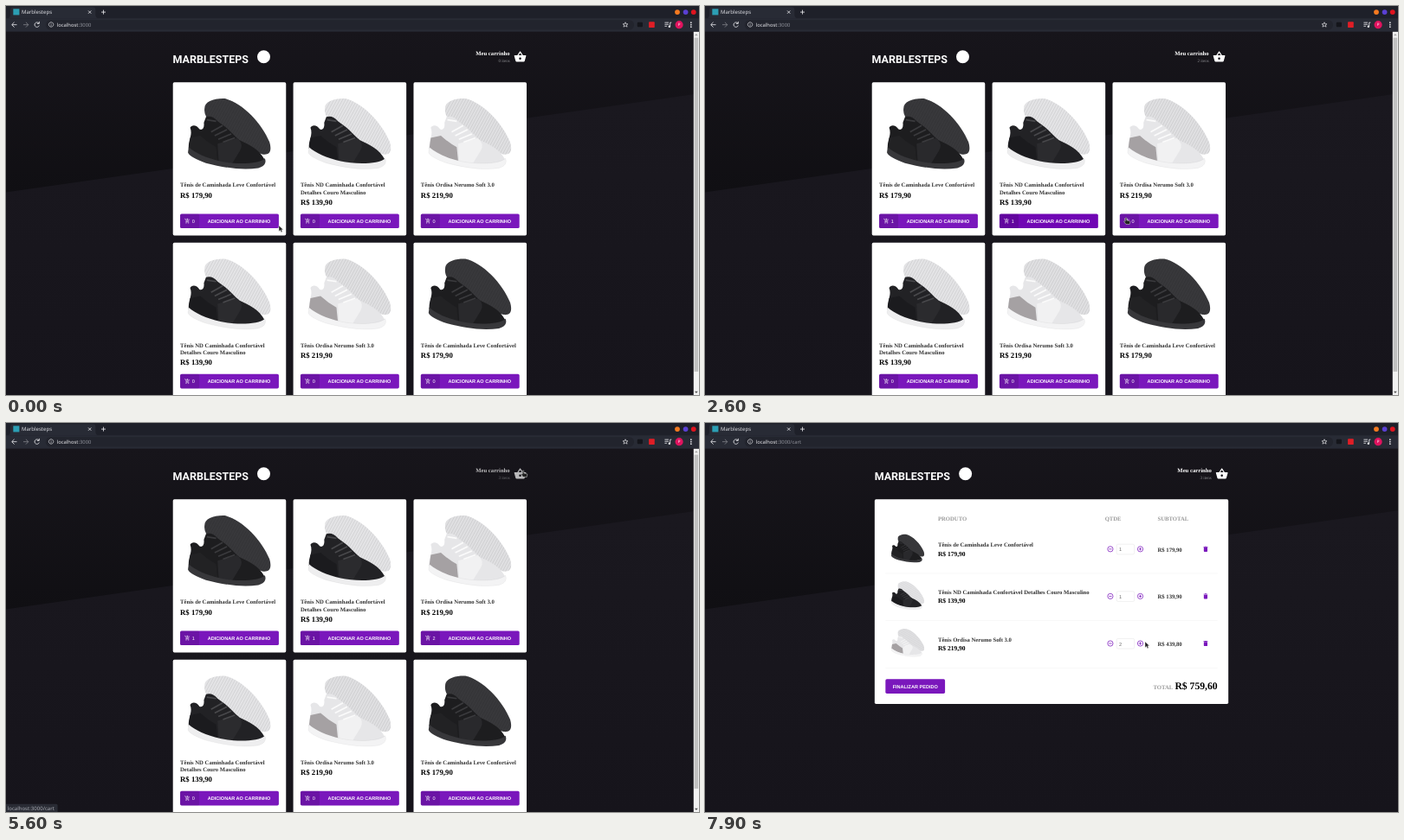
Animation, 800 px wide and 450 px high, one loop 8 s. Source, as an HTML page:

```html
<!DOCTYPE html>
<html lang="pt">
<head>
<meta charset="utf-8">
<title>Marblesteps</title>
<style>
html, body { margin: 0; width: 100%; height: 100%; overflow: hidden; background: #17151c; }
svg { display: block; width: 100vw; height: 100vh; font: bold 16px "Liberation Serif", "Times New Roman", serif; text-rendering: geometricPrecision; }
.sans { font-family: "Liberation Sans", Arial, sans-serif; }
.ui { font-family: "Noto Sans", sans-serif; font-weight: 400; }
.logo { font-family: Roboto, sans-serif; }
.plain { font-weight: 400; }
.end { text-anchor: end; }
.mid { text-anchor: middle; }
.line { fill: none; stroke: #e8e8ec; stroke-width: 2; }
</style>
</head>
<body>
<svg viewBox="0 0 1920 1080" preserveAspectRatio="none">
  <defs>
    <linearGradient id="upper" x2="0" y2="1"><stop stop-color="#17151b"/><stop offset="1" stop-color="#100f13"/></linearGradient>
    <linearGradient id="lower" x2="0" y2="1"><stop stop-color="#1b1920"/><stop offset="1" stop-color="#16141b"/></linearGradient>
    <pattern id="tread" width="7" height="20" patternUnits="userSpaceOnUse" patternTransform="rotate(28)"><path d="M1 0V20" stroke="#000" stroke-width="2"/></pattern>
    <path id="sole" d="M56 52C56 34 80 24 112 25C160 36 214 92 236 146C243 172 236 182 218 180C180 172 120 124 74 92C60 78 54 66 56 52Z"/>
    <path id="basket" d="M17.21 9l-4.38-6.56c-.19-.28-.51-.42-.83-.42-.32 0-.64.14-.83.43L6.79 9H2c-.55 0-1 .45-1 1 0 .09.01.18.04.27l2.54 9.27c.23.84 1 1.46 1.92 1.46h13c.92 0 1.69-.62 1.93-1.46l2.54-9.27L23 10c0-.55-.45-1-1-1h-4.79zM9 9l3-4.4L15 9H9zm3 8c-1.1 0-2-.9-2-2s.9-2 2-2 2 .9 2 2-.9 2-2 2z"/>
    <g id="add" fill="none" stroke="#fff" stroke-width="2">
      <path d="M12 1V9M8 5H16M1 3H3.7L8 12H16L20 4.5M8 12L6 15.8H19"/>
      <circle cx="7" cy="20" r="1"/><circle cx="17" cy="20" r="1"/>
    </g>
    <path id="trash" d="M6 19c0 1.1.9 2 2 2h8c1.1 0 2-.9 2-2V7H6zM19 4h-3.5l-1-1h-5l-1 1H5v2h14z"/>
    <path id="arrow" d="M0 0V16L4 12.5L6.5 18.5L9.5 17L7 11.5H12Z" fill="#222" stroke="#ddd"/>
    <path id="hand" d="M-2 1Q0 -2 2 1V7L9 8.5Q12 9 11.5 12L10 18H0L-6 10Q-6 7 -2 10Z" fill="#222" stroke="#ccc" stroke-width="1.3"/>
  </defs>
  <g id="scene"></g>
</svg>
<script>
const PURPLE = '#7a17bc', HOVER = '#7006b4';
const LOOP = 8000, STEP = 100, PX = 2.4;

const shoes = [
  { lines: ['Tênis de Caminhada Leve Confortável'], price: 179.9,
    back: '#38383b', upper: '#1d1d1f', panel: '#222224', strap: '#29292c', front: '#37373a', lace: '#3a3a3d' },
  { lines: ['Tênis ND Caminhada Confortável', 'Detalhes Couro Masculino'], price: 139.9,
    back: '#e4e4e6', upper: '#222225', panel: '#1b1b1e', strap: '#2b2b2e', front: '#eeeeef', lace: '#48484b' },
  { lines: ['Tênis Ordisa Nerumo Soft 3.0'], price: 219.9,
    back: '#e0e0e2', upper: '#e6e6e8', panel: '#a5a1a3', strap: '#f1f1f2', front: '#f3f3f4', lace: '#fbfbfb' }
];
const grid = [0, 1, 2, 1, 2, 0];

// Cursor stops: time, x, y in stage pixels
const path = [
  [0, 315, 254], [100, 313, 254], [500, 300, 250], [1000, 300, 250], [1200, 333, 249], [1300, 351, 248],
  [1400, 361, 248], [1800, 363, 248], [2400, 372, 248], [2500, 432, 247], [2600, 486, 245],
  [2800, 503, 245], [2900, 514, 244], [4600, 514, 244], [4900, 553, 160], [5200, 603, 37],
  [5400, 597, 55], [6600, 597, 55], [6900, 592, 100], [7400, 581, 192], [7900, 508, 253], [8000, 508, 253]
];

const money = n => 'R$ ' + n.toFixed(2).replace('.', ',');
const text = (x, y, s, size = 16, fill = '#333', cls = '') =>
  `<text x="${x}" y="${y}" font-size="${size}" fill="${fill}" class="${cls}">${s}</text>`;
const rect = (x, y, w, h, fill, r = 0) => `<rect x="${x}" y="${y}" width="${w}" height="${h}" rx="${r}" fill="${fill}"/>`;
const dot = (x, y, r, fill) => `<circle cx="${x}" cy="${y}" r="${r}" fill="${fill}"/>`;
const line = (d, extra = '') => `<path class="line" d="${d}" ${extra}/>`;
const icon = (id, x, y, size, fill) =>
  `<use href="#${id}" transform="translate(${x} ${y}) scale(${size / 24})" fill="${fill}"/>`;

function cursorAt(t) {
  const i = Math.max(1, path.findIndex(p => p[0] >= t));
  const [t0, x0, y0] = path[i - 1], [t1, x1, y1] = path[i];
  const k = Math.max(0, (t - t0) / (t1 - t0));
  return [(x0 + (x1 - x0) * k) * PX, (y0 + (y1 - y0) * k) * PX];
}

const cardAt = i => [462.5 + (i % 3) * 333.33, 212 + Math.floor(i / 3) * 445];

// Index of the hovered buy button, 'cart' for the header link, or null
function hit(t) {
  const [x, y] = cursorAt(t);
  if (x > 1300 && x < 1448 && y > 120 && y < 162) return 'cart';
  if (t >= 5700) return null;
  for (let i = 0; i < 6; i++) {
    const [cx, cy] = cardAt(i);
    if (x >= cx + 20 && x <= cx + 293 && y >= cy + 365 && y <= cy + 405) return i;
  }
  return null;
}

function shoe(s, x, y, scale = 1) {
  return `<g transform="translate(${x} ${y}) scale(${scale})">
    <use href="#sole" fill="${s.back}"/><use href="#sole" fill="url(#tread)" opacity=".09"/>
    <path fill="${s.upper}" d="M16 106C20 97 34 97 42 110C50 114 56 106 54 92L60 76C70 72 84 76 92 88L114 104C128 116 140 130 152 140C178 152 208 166 222 194C205 210 140 212 100 202C60 192 30 176 12 164C10 140 24 126 16 106Z"/>
    <path fill="${s.panel}" d="M16 134L44 128Q66 148 88 160L92 200Q44 188 12 164Z"/>
    <path fill="${s.strap}" d="M92 150L146 135Q166 150 154 170L132 206L95 200Z"/>
    <path fill="none" stroke="${s.lace}" stroke-width="4" d="M74 118L106 100M84 128L118 111M94 138L130 123M107 146L140 134M62 84L88 88"/>
    <path fill="${s.front}" stroke="#000" stroke-opacity=".1" d="M12 160C30 176 60 190 100 199C140 208 205 208 223 191C228 203 222 213 205 218C160 225 110 217 60 204C35 195 14 186 10 175Z"/>
  </g>`;
}

function browser(cart) {
  return rect(0, 0, 1920, 34, '#1e2029') + rect(0, 34, 1920, 37, '#282b35')
    + `<path fill="#282b35" d="M4 34Q12 34 12 24V10Q12 3 20 3H240Q248 3 248 10V24Q248 34 256 34Z"/>`
    + rect(20, 8, 17, 17, '#2c9fb4') + text(43, 22, 'Marblesteps', 14.5, '#dcdde2', 'ui')
    + line('M228 13L236 21M236 13L228 21') + line('M264 17H276M270 11V23')
    + dot(1860, 17, 7, '#f47a20') + dot(1883, 17, 7, '#5a40d4') + dot(1905, 17, 7, '#e0141f')
    + rect(110, 39, 1630, 27, '#22242d', 13)
    + line('M30 52H17M23 45L16 52L23 59') + line('M48 52H61M55 45L62 52L55 59', 'opacity=".45"')
    + line('M91 48A6.5 6.5 0 1 0 92 54M92 43V49H86')
    + line('M125 45A6.5 6.5 0 1 0 125.1 45M125 51V55M125 48V49.5', 'stroke-width="1.5" opacity=".8"')
    + text(141, 57, `localhost<tspan fill="#92949d">:3000${cart ? '/cart' : ''}</tspan>`, 14, '#e6e6ea', 'ui')
    + line('M1716 45L1718 50H1723L1719 53L1721 58L1716 55L1711 58L1713 53L1709 50H1714Z', 'opacity=".8"')
    + rect(1749, 45, 15, 13, '#14151b', 3) + rect(1781, 44, 16, 16, '#e01e26', 2)
    + line('M1825 46H1836M1825 51H1836M1825 56H1831M1840 56V46H1844')
    + dot(1838, 57, 3, '#e8e8ec')
    + dot(1865, 52, 11, '#e0135f') + text(1865, 56, 'P', 11, '#fff', 'ui mid')
    + [46, 52, 58].map(y => dot(1898, y, 2, '#e8e8ec')).join('');
}

function header(cart, count, dim) {
  return `<g transform="translate(${cart ? 7.5 : 0})">`
    + text(462, 158, 'MARBLESTEPS', 30, '#fff', 'logo') + dot(714, 141, 18, '#fff')
    + `<g opacity="${dim ? .7 : 1}">` + text(1396, 137, 'Meu carrinho', 16, '#fff', 'end')
    + text(1396, 156, count + ' itens', 12, '#8c8c90', 'end plain')
    + icon('basket', 1406.5, 123, 36, '#fff') + '</g></g>';
}

function card(i, amount, hovered) {
  const s = shoes[grid[i]], [x, y] = cardAt(i), left = x + 20, top = y + 365;
  return rect(x, y, 313.33, 425, '#fff', 4) + shoe(s, x + 31.67, y + 20)
    + s.lines.map((l, n) => text(left, y + 290 + n * 20, l)).join('')
    + text(left, y + 300 + s.lines.length * 20, money(s.price), 21, '#000')
    + rect(left, top, 273.33, 40, hovered ? HOVER : PURPLE, 4)
    + rect(left, top, 53, 40, 'rgba(0,0,0,.12)', 4)
    + icon('add', left + 12, top + 12, 16) + text(left + 33, top + 25, amount, 13.33, '#fff', 'sans plain')
    + text(left + 163.2, top + 25, 'ADICIONAR AO CARRINHO', 13.33, '#fff', 'sans mid');
}

function scrollbar() {
  return rect(1905, 71, 15, 1009, '#f1f1f1') + rect(1907, 88, 11, 927, '#c1c1c1')
    + '<path fill="#a3a3a3" d="M1908 82L1912.5 77L1917 82Z"/><path fill="#505050" d="M1908 1070L1912.5 1075L1917 1070Z"/>';
}

function cartRow(s, i, amount) {
  const y = 287 + i * 131, mid = y + 63;
  const round = x => `<circle cx="${x}" cy="${mid}" r="7.5"/><path d="M${x - 4} ${mid}H${x + 4}"/>`;
  return shoe(s, 512, y + 12, .4)
    + text(645.5, y + 57, s.lines.join(' ')) + text(645.5, y + 82, money(s.price), 18, '#000')
    + `<g fill="none" stroke="${PURPLE}" stroke-width="1.8">${round(1123)}${round(1206)}<path d="M1206 ${mid - 4}V${mid + 4}"/></g>`
    + `<rect x="1140.5" y="${mid - 13.5}" width="49" height="28" rx="4" fill="#fff" stroke="#ddd"/>`
    + text(1147, mid + 6, amount, 13.33, '#666', 'sans plain')
    + text(1254, y + 70, money(s.price * amount)) + icon('trash', 1377, mid - 10, 20, PURPLE)
    + rect(500, y + 130, 920, 1, '#eee');
}

function cartPage(amounts) {
  const total = shoes.reduce((sum, s, i) => sum + s.price * amounts[i], 0);
  return rect(470, 212, 980, 568, '#fff', 4)
    + [[645.5, 'PRODUTO'], [1108, 'QTDE'], [1254, 'SUBTOTAL']].map(([x, s]) => text(x, 270, s, 16, '#999')).join('')
    + shoes.map((s, i) => cartRow(s, i, amounts[i])).join('')
    + rect(500, 711, 165, 40, PURPLE, 4) + text(582.5, 736, 'FINALIZAR PEDIDO', 13.33, '#fff', 'sans mid')
    + text(1242, 740, 'TOTAL', 16, '#999') + text(1420, 740, money(total), 28, '#000', 'end');
}

function render(t) {
  const cart = t >= 5700;
  const amounts = [+(t >= 600), +(t >= 2000), (t >= 3200) + (t >= 4000)];
  const hovered = hit(Math.max(0, t - STEP)), [x, y] = cursorAt(t);
  const shown = i => i < 3 ? amounts[i] : 0;
  return rect(0, 71, 1920, 1009, 'url(#lower)') + '<path fill="url(#upper)" d="M0 71H1920V243L0 517Z"/>'
    + header(cart, amounts.filter(Boolean).length, hovered === 'cart')
    + (cart ? cartPage(amounts) : grid.map((_, i) => card(i, shown(i), hovered === i)).join('') + scrollbar())
    + browser(cart)
    + (t >= 5500 && t < 6900 ? rect(-4, 1058, 147, 26, '#292b34', 4) + text(4, 1074, 'localhost:3000/cart', 14.5, '#a9abb3', 'ui') : '')
    + `<use href="#${hit(t) === null ? 'arrow' : 'hand'}" x="${x}" y="${y}"/>`;
}

const scene = document.getElementById('scene');
let last = -1;
function frame(now) {
  const t = Math.floor(now % LOOP / STEP) * STEP;
  if (t !== last) scene.innerHTML = render(last = t);
  requestAnimationFrame(frame);
}
frame(0);
</script>
</body>
</html>
```
